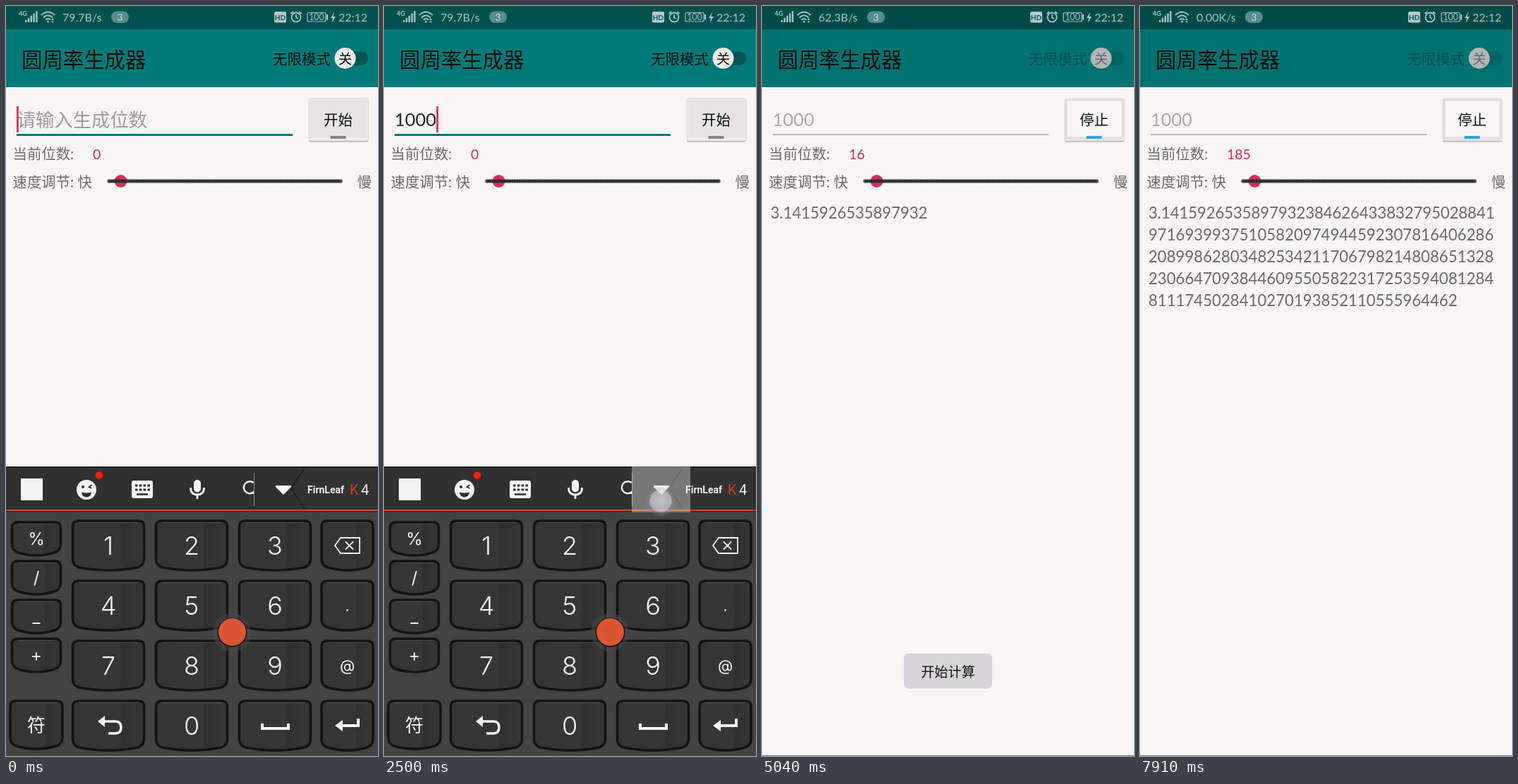
These frames come from a looping animation (527x1062 px, 7990 ms). An HTML page:

```html
<!DOCTYPE html>
<html lang="zh">
<head>
<meta charset="utf-8">
<title>圆周率生成器</title>
<style>
html, body { margin: 0; width: 100%; height: 100%; overflow: hidden; background: #f7f5f6; }
svg { display: block; width: 527px; height: 1062px; font-family: Lato, "Noto Sans CJK SC", "Noto Sans CJK", sans-serif; }
text { white-space: pre; }
.mid { text-anchor: middle; }
.label { font-size: 20.4px; fill: #6b696a; }
.status { font-size: 16px; fill: #a9c4c2; }
.key text { font-family: Inter, "Noto Sans CJK SC", sans-serif; fill: #f4f4f4; text-anchor: middle; }
.line { fill: none; stroke: #f4f4f4; }
#digits { font-size: 22.2px; fill: #6b696a; }
</style>
</head>
<body>
<svg viewBox="0 0 527 1062">
  <defs>
    <linearGradient id="gloss">
      <stop offset="0" stop-color="#353535"/><stop offset=".66" stop-color="#363636"/>
      <stop offset=".68" stop-color="#303030"/><stop offset="1" stop-color="#363636"/>
    </linearGradient>
    <radialGradient id="glow">
      <stop offset="0" stop-color="#e6e6ec" stop-opacity=".68"/><stop offset=".64" stop-color="#d2d2da" stop-opacity=".6"/>
      <stop offset=".74" stop-color="#8c8c9a" stop-opacity=".36"/><stop offset="1" stop-color="#8c8c9a" stop-opacity="0"/>
    </radialGradient>
    <pattern id="grip" width="3" height="3" patternUnits="userSpaceOnUse"><circle cx="1" cy="1" r=".7" fill="#c04a2d"/></pattern>
  </defs>

  <rect width="527" height="1062" fill="#f7f5f6"/>
  <rect y="1061" width="527" height="1" fill="#777"/>
  <rect id="header" width="527" height="115"/>
  <rect id="bar" width="527" height="33"/>

  <g fill="#a9c4c2">
    <text x="18" y="14" font-size="9" font-weight="700">4G</text>
    <g id="signal"></g>
    <g fill="none" stroke="#a9c4c2" stroke-width="1.800">
      <path d="M50 13Q59.5 4 69 13M53 16.500Q59.500 10 66 16.500M56 19.500Q59.500 16.500 63 19.500"/>
      <circle cx="411" cy="16" r="6.500"/><path d="M411 12V16.500L414 18M403.500 11L407 8M418.500 11L415 8"/>
      <rect x="427" y="9.500" width="26" height="12.500" rx="2" stroke-width="1.200"/>
    </g>
    <circle cx="59.500" cy="22" r="1.500"/>
    <path d="M64 20l2-3 2 3zM64 21.500h4l-2 2.500z"/>
    <text id="speed" class="status" x="80" y="21.500"></text>
    <rect x="149" y="7.500" width="25" height="16.500" rx="8" fill="#578d8a"/>
    <text class="mid" x="161.500" y="20.500" font-size="13" fill="#c6dcda">3</text>
    <rect x="380" y="8" width="17" height="15.500" rx="2" fill="#b4cac8"/>
    <text class="mid" x="388.500" y="19.500" font-size="10" font-weight="700" fill="#004f4c">HD</text>
    <text class="mid" x="440" y="20.300" font-size="12.500">100</text>
    <rect x="454" y="12" width="2" height="7.500"/>
    <path d="M465 8.500L460 17h3l-1.500 7 5.500-9h-3.500z"/>
    <text class="status" x="471" y="21.500">22:12</text>
  </g>

  <text x="22" y="87" font-size="29.400" fill="#001010">圆周率生成器</text>
  <text id="mode" x="378" y="82.700" font-size="20.500">无限模式</text>
  <rect id="track" x="470" y="64.500" width="43" height="19.500" rx="9.700"/>
  <circle cx="481" cy="75" r="15.500" fill="#002f2e" opacity=".2"/>
  <circle id="knob" cx="480.500" cy="74" r="15"/>
  <text id="off" class="mid" x="480.500" y="81.500" font-size="19.500">关</text>

  <text id="hint" x="15.500" y="171" font-size="26.400" font-weight="300" fill="#9d9b9c">请输入生成位数</text>
  <text id="entry" x="15" y="170" font-size="25.400"></text>
  <rect id="rule" x="15" width="391"/>
  <rect id="caret" y="142" width="2.800" height="37" fill="#c9375f"/>

  <rect x="429" y="132.500" width="84" height="60" rx="2" fill="#a9a7a8"/>
  <rect x="429" y="131" width="84" height="60" rx="2" fill="#eeecee" stroke="#cfcdce" stroke-width=".8"/>
  <rect id="face" x="431" y="133" width="80" height="54" rx="1"/>
  <rect id="lamp" x="459.500" y="184" width="22" height="4"/>
  <text id="action" class="mid" x="470.500" y="169" font-size="20.400" fill="#0c0c0c"></text>

  <g class="label">
    <text x="9.500" y="217">当前位数:</text>
    <text x="9.500" y="257">速度调节: 快</text>
    <text x="497.500" y="257">慢</text>
  </g>
  <text id="count" x="123" y="216.500" font-size="19.500" fill="#c4305a"></text>
  <circle cx="162.500" cy="248" r="9" fill="#d52f5c"/>
  <path d="M146 248H474" stroke="#333" stroke-width="5.500" stroke-linecap="round" stroke-dasharray="0 3.280" opacity=".85"/>
  <path d="M146 248H474" stroke="#2a2a2a" stroke-width="2.400"/>
  <g id="digits"></g>

  <g id="toast">
    <rect x="201" y="917" width="125" height="49.500" rx="6" fill="#d7d5d7"/>
    <text class="mid" x="263.500" y="949.500" font-size="19.200" fill="#111">开始计算</text>
  </g>

  <g id="board">
    <rect y="652" width="527" height="410" fill="#434343"/>
    <rect y="652" width="527" height="61" fill="#303030"/>
    <rect y="652" width="527" height="1.500" fill="#1c1c1c"/>
    <path d="M423 654L404 683 423 712H527V654z" fill="#323232"/>
    <path d="M423 654L404 683 423 712" fill="none" stroke="#121212"/>
    <rect y="713" width="527" height="2" fill="#c94e2b"/>
    <rect y="715" width="527" height="1.500" fill="#2c2c2c"/>
    <rect x="21" y="669" width="31" height="31" fill="#f4f4f4"/>
    <circle cx="114" cy="685" r="14" fill="#f4f4f4"/>
    <path d="M107 688.500q7 2 14 0q-1 7-7 7t-7-7z" fill="#2e2e2e"/>
    <circle cx="109" cy="681" r="2" fill="#2e2e2e"/>
    <path d="M121.500 678l-4 3 4 2" fill="none" stroke="#2e2e2e" stroke-width="1.800"/>
    <circle cx="132" cy="664.500" r="5.300" fill="#f51f0e"/>
    <rect x="178" y="672" width="30" height="25" rx="3" fill="#f4f4f4"/>
    <path d="M183 679h21M183 685h21" stroke="#2e2e2e" stroke-width="3" stroke-dasharray="3.500 2.300"/>
    <path d="M185 691.500h16" stroke="#2e2e2e" stroke-width="2.500"/>
    <rect x="266" y="671" width="10" height="17.500" rx="5" fill="#f4f4f4"/>
    <path class="line" d="M261.500 682q0 10 9.500 10t9.500-10M271 692v6" stroke-width="2.800"/>
    <path class="line" d="M350.500 675A8.500 8.500 0 1 0 350.500 688.500V691" stroke-width="2.500"/>
    <path d="M351.500 661V708" stroke="#8a8a8a"/>
    <path d="M382 679h22v2l-11 11-11-11z" fill="#fff"/>
    <text x="427" y="690" font-size="14" font-weight="700" fill="#f0f0f0" font-family="Roboto, sans-serif">FirnLeaf</text>
    <text x="487" y="691.500" font-size="20" fill="#f0f0f0" font-family="Roboto, sans-serif"><tspan fill="#dc3a2a">K</tspan> <tspan x="503">4</tspan></text>
    <g id="keys" class="key"></g>
    <g class="line">
      <path d="M466 764l8-11h27v22h-27zM481 758.500l11 11M492 758.500l-11 11" stroke-width="1.800"/>
      <path d="M136 1013h19q8 0 8 8.500t-8 8.500h-10" stroke-width="3.500"/>
      <path d="M363 1016v7h37v-7" stroke-width="4"/>
      <path d="M474 1019h25v-10" stroke-width="4"/>
      <path d="M130 1013l10-8v16zM466 1019l11-8v16z" fill="#f4f4f4" stroke="none"/>
    </g>
    <circle cx="320" cy="887" r="27" fill="#4a4a4a" opacity=".5"/>
    <circle cx="320.500" cy="887" r="21" fill="#191919"/>
    <circle cx="320.500" cy="886.500" r="19.500" fill="#dd5635"/>
    <circle cx="320.500" cy="886.500" r="14" fill="url(#grip)"/>
    <rect id="pressed" x="351" y="652" width="83" height="65" fill="#fff" opacity=".34"/>
  </g>
  <circle id="touch" r="23" fill="url(#glow)"/>
</svg>
<script>
const LOOP = 7990, RUN = 4490, STEP = 77.4;
const PI = "3.1415926535897932384626433832795028841971693993751058209749445923078164062862089986280348253421170679821480865132823066470938446095505822317253594081284811174502841027019385211055596446229489";
const $ = id => document.getElementById(id);
const within = (t, spans) => spans.find(([from, to]) => t >= from && t < to);
const clamp = v => Math.max(0, Math.min(1, v));
const show = (id, on) => $(id).style.visibility = on ? "visible" : "hidden";
const set = (id, attrs) => { for (const k in attrs) $(id).setAttribute(k, attrs[k]); };

function add(parent, tag, attrs, content = "") {
  const el = document.createElementNS("http://www.w3.org/2000/svg", tag);
  for (const k in attrs) el.setAttribute(k, attrs[k]);
  el.textContent = content;
  return $(parent).appendChild(el);
}

function addKey(x, y, w, h, label, size) {
  const d = `M${x + 8} ${y}H${x + w - 8}q8 0 8 8V${y + h - 16}q0 9-9 12Q${x + w * .7} ${y + h} ${x + w / 2} ${y + h}` +
    `Q${x + w * .3} ${y + h} ${x + 9} ${y + h - 4}q-9-3-9-12V${y + 8}q0-8 8-8z`;
  add("keys", "path", { d, fill: "url(#gloss)", stroke: "#131313", "stroke-width": 3.5 });
  add("keys", "path", { d: `M${x + 8} ${y + 2.5}H${x + w - 8}`, stroke: "#505050" });
  add("keys", "text", { x: x + w / 2, y: y + h / 2 + size * .37, "font-size": size, "font-weight": size > 30 ? 300 : 400 }, label);
}

["%", "/", "_", "+"].forEach((c, i) => addKey(8.5, 731 + 55 * i, 69, 47, c, 24));
const rows = ["123 ", "456.", "789@", " 0  "];
rows.forEach((row, r) => [...row].forEach((c, i) =>
  addKey(i < 3 ? 94.5 + 118 * i : 447, 729 + 85 * r, i < 3 ? 101 : 73, 70, c, i < 3 ? 36 : 22)));
addKey(6, 984, 74, 68, "符", 26);

for (let i = 0; i < 5; i++) add("signal", "rect", { x: 27 + 3.8 * i, y: 20 - 3.2 * i, width: 2.4, height: 3 + 3.2 * i });
const lines = [0, 1, 2, 3, 4].map(i =>
  add("digits", "text", { x: 12, y: 301 + 31 * i, "letter-spacing": i ? 0 : -.1 }));

// [from, to, x, y]
const touches = [
  [390, 700, 148, 768], [930, 1080, 272, 1012], [1160, 1310, 273, 1011], [1390, 1620, 274, 1010],
  [2330, 2570, 392, 701], [RUN, 4722, 474, 163]
];
const carets = [[0, 1940], [2500, 2570], [2800, 3180], [3640, 4100], [4567, 4722]];
const typed = [540, 1010, 1240, 1470];
const speeds = [[0, 2570, "79.7B/s"], [2570, 3640, "0.00K/s"], [3640, 4722, "126B/s"], [4722, 6960, "62.3B/s"], [6960, LOOP, "0.00K/s"]];

function render(t) {
  const k = Math.floor((t - RUN) / STEP);
  const running = k >= 3, closed = t >= 2570;
  const n = Math.max(0, Math.round(16 + (k - 7) * 4.56));
  const value = "1000".slice(0, typed.filter(at => t >= at).length);

  set("header", { fill: closed ? "#007270" : "#007a78" });
  set("bar", { fill: closed ? "#004b48" : "#00514e" });
  $("speed").textContent = within(t, speeds)[2];

  set("mode", { fill: running ? "#005351" : "#001212" });
  set("track", { fill: running ? "#006563" : "#005552" });
  set("knob", { fill: running ? "#b3b6b6" : "#ececec" });
  set("off", { fill: running ? "#656868" : "#111" });

  show("hint", !value);
  $("entry").textContent = value;
  set("entry", { fill: running ? "#aaa8a9" : "#262626" });
  set("rule", running ? { y: 181.5, height: 1.2, fill: "#969495" } : { y: 181, height: 3, fill: closed ? "#007270" : "#007a78" });
  set("caret", { x: value ? 15 + 14.8 * value.length : 15 });
  show("caret", within(t, carets));

  set("face", running ? { fill: "#f7f5f6", stroke: "#dfdddf", "stroke-width": 3 } : { fill: "#e5e3e4", stroke: "none" });
  set("lamp", { fill: running ? "#35a3da" : "#858384" });
  $("action").textContent = running ? "停止" : "开始";

  $("count").textContent = n;
  lines.forEach((el, i) => el.textContent = n ? PI.slice(0, n + 2).slice(i && 38 * i + 1, 38 * i + 39) : "");
  set("toast", { opacity: Math.min(clamp((k - 3) / 4 + .25), clamp((32 - k) / 4)) });

  show("board", t < 2650);
  set("board", closed ? { opacity: .5, transform: "translate(0 120)" } : { opacity: 1, transform: "" });
  $("pressed").style.display = t >= 2500 && !closed ? "" : "none";

  const tap = within(t, touches);
  show("touch", tap);
  if (tap) set("touch", { cx: tap[2], cy: tap[3] });
}

const start = performance.now();
function tick() {
  render((performance.now() - start) % LOOP);
  requestAnimationFrame(tick);
}
tick();
</script>
</body>
</html>
```
